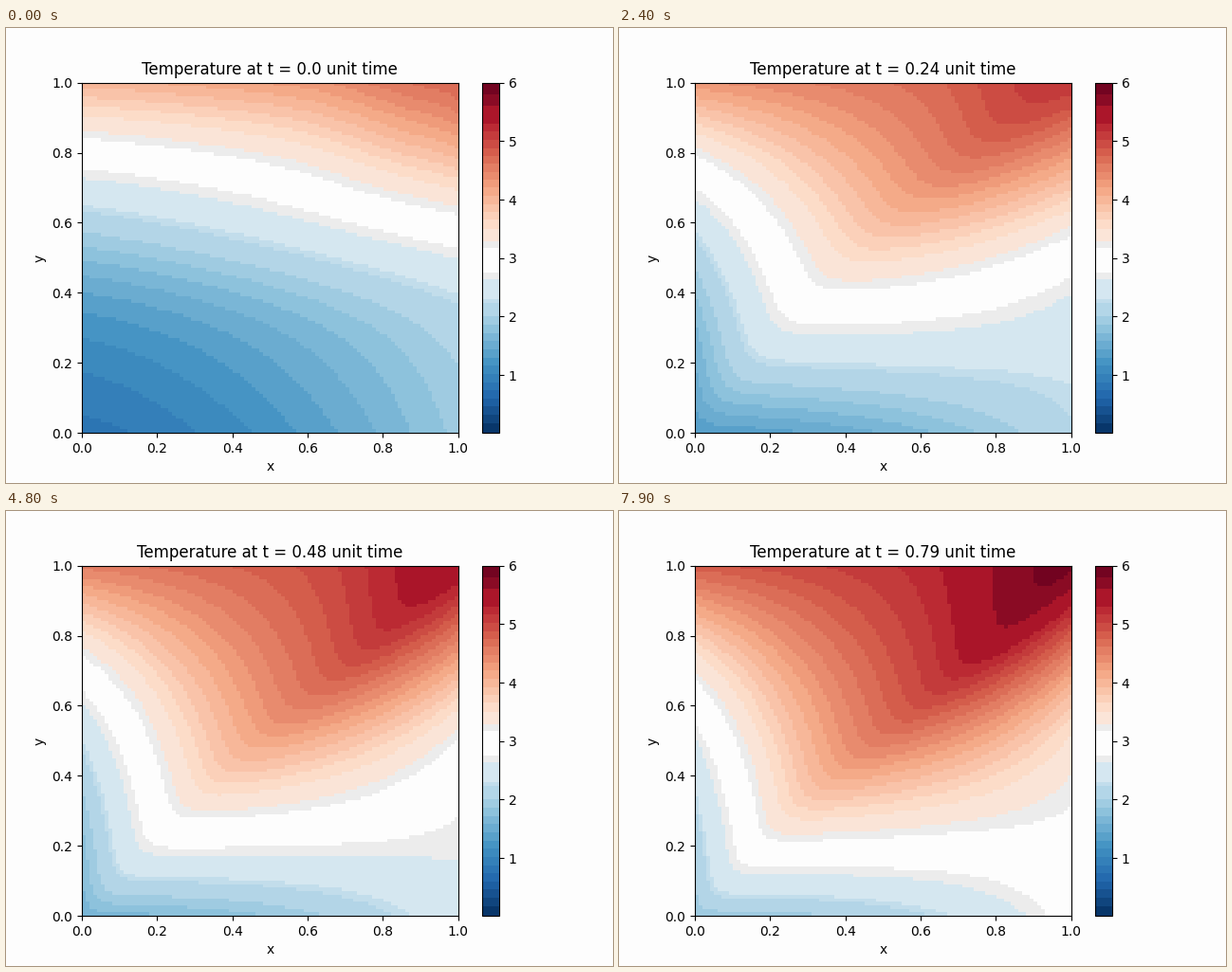
These frames come from a looping animation (640 by 480 pixels, 8000 ms). A matplotlib script:

```python
import numpy as np
import matplotlib.pyplot as plt
from matplotlib.animation import FuncAnimation
from matplotlib.colors import ListedColormap

FRAMES, DT, N = 80, 0.01, 100
VMIN, VMAX = 0.01, 6.0

X, Y = np.meshgrid(np.linspace(0, 1, N), np.linspace(0, 1, N))


def softplus(z, width):
    return width * np.logaddexp(0, z / width)


def softmin(a, b, width):
    return -width * np.logaddexp(-a / width, -b / width)


def upper_layer(t, slow, fast):
    """Warm layer: cools downwards, most strongly at the left wall."""
    ridge = (0.2 + 0.38 * t + 0.2 * fast) / (1 + np.exp((0.75 - X) / 0.07))
    top = 4.02 + t + 0.08 * slow + (0.6 - 0.3 * fast) * X + ridge
    drop = 2.95 * (1 - X) ** (2.3 - 2 * slow)
    return top - drop * np.tanh((1 - Y) / 0.53)


def lower_layer(t, slow, fast):
    """Cool layer: gentle slope near the floor, steeper above a bend."""
    left = 2.3 - 1.45 * np.exp(-t / 0.55)
    right = 1.9 + 1.25 * t
    floor = left + (right - left) * X ** (1.5 + 1.2 * t)
    s_left, s_right = 6.1 - 5 * slow, 0.9 - 0.5 * slow
    slope = s_left + (s_right - s_left) * X ** 2
    steep = 4.4 + 2 * t + 0.3 * fast
    bend = 0.39 + 0.22 * t * X ** 2
    return floor + slope * Y + (steep - slope) * softplus(Y - bend, 0.08)


def field(t):
    slow, fast = np.exp(-t / 0.2), np.exp(-t / 0.06)
    return softmin(upper_layer(t, slow, fast), lower_layer(t, slow, fast),
                   0.13 + 0.07 * slow)


def banded_map():
    """RdBu_r in flat bands, with wider ones around the neutral middle."""
    middle = [2.0, 2.23, 2.3, 2.63, 2.75, 3.17, 3.28, 3.5]
    edges = np.concatenate([np.linspace(0.17, 1.85, 13), middle,
                            np.linspace(3.65, 5.3, 13), [5.6, 5.8]])
    full = np.concatenate([[0], edges, [VMAX]])
    colors = plt.get_cmap("RdBu_r")((full[:-1] + full[1:]) / 2 / VMAX)
    mid = np.searchsorted(edges, 3.0)
    colors[mid, :3] = 253 / 255
    colors[[mid - 1, mid + 1], :3] = 236 / 255
    v = np.linspace(VMIN, VMAX, 600)
    return ListedColormap(colors[np.searchsorted(edges, v)])


fig, ax = plt.subplots(figsize=(6.4, 4.8), dpi=100, facecolor="#fdfdfd")
im = ax.imshow(field(0.0), cmap=banded_map(), vmin=VMIN, vmax=VMAX,
               origin="lower", extent=(0, 1, 0, 1), aspect="auto",
               interpolation="nearest")
fig.colorbar(im, ax=ax, ticks=range(1, 7))
ax.set_xlabel("x")
ax.set_ylabel("y")
title = ax.set_title("")


def update(i):
    t = i * DT
    im.set_data(field(t))
    title.set_text(f"Temperature at t = {t} unit time")
    return im, title


anim = FuncAnimation(fig, update, frames=FRAMES, interval=100,
                     repeat=True, repeat_delay=0, blit=False)
plt.show()
```
